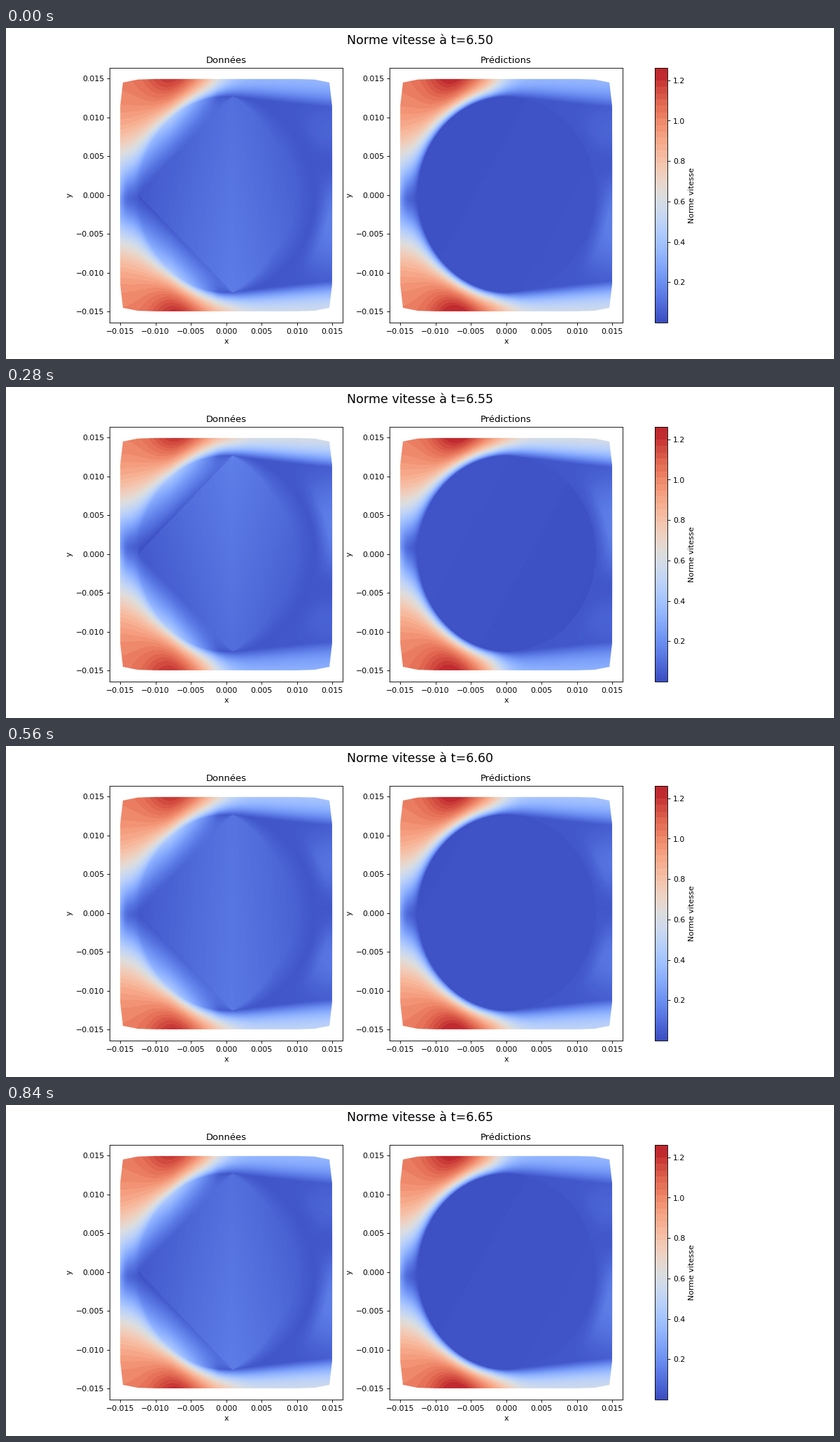
These frames come from a looping animation (1183x473 px, 980 ms). A matplotlib script:

```python
import numpy as np
import matplotlib.pyplot as plt
from matplotlib.animation import FuncAnimation
from matplotlib.colors import ListedColormap, Normalize
from matplotlib.patches import Polygon

WIDTH, HEIGHT, DPI = 1183, 473, 78.86
FRAMES, STEP_MS, PERIOD = 7, 140, 6
VMIN, VMAX = 0.0007, 1.2624
R = 12.6                       # cylinder radius, mm
TIP_X, TIP_Y = 0.7, 12.5       # top corner of the interpolated diamond

X, Y = np.meshgrid(np.linspace(-15.05, 15.05, 305), np.linspace(-15, 15, 334))
RAD = np.hypot(X, Y)
ABS_Y, SIDE = np.abs(Y), np.sign(Y)


def sigmoid(z):
    return 1 / (1 + np.exp(-z))


def bump(z):
    return np.exp(-z ** 2)


def mix(a, b, w):
    return a + (b - a) * w


def swing(n, peak=2.25):
    """Vortex shedding signal, +1 when the upper side is fastest."""
    return np.cos(2 * np.pi * (n - peak) / PERIOD)


def stream(s, slip, delta, boost):
    """Speed outside the cylinder: inflow, acceleration and shear layers."""
    y = np.abs(Y - 0.8 * s)
    inflow = 0.10 + 0.94 * (1 - np.exp(-(y / 6.2) ** 1.5))
    peak = (0.23 + boost + 0.02 * SIDE * s) * bump((X + 7.2 - 0.5 * SIDE * s) / 4)
    inflow = inflow + peak * np.clip((ABS_Y - 7) / 8, 0, 1)
    outflow = 0.50 + 0.16 * SIDE * s
    speed = mix(inflow, outflow, sigmoid((X + 0.3 - SIDE * s) / 1.2))

    down = np.maximum(X, 0)
    offset = slip * np.clip(-X / 8, 0.15, 1)
    front = 1 - np.exp(-(np.maximum(RAD - R, 0) + offset) / delta)
    depth = np.maximum(ABS_Y - 12.4 + 0.12 * down, 0)
    rear = 1 - np.exp(-(depth / (1.55 + 0.055 * down)) ** 1.5)
    v = speed * mix(front, rear, np.clip((X + 2) / 4, 0, 1))
    return v + 0.17 * bump((X + 15.2) / 0.7) * bump(Y / 3)


def wake(n):
    calm = -5 * swing(n, 2.4)
    edge = sigmoid((X - 11.5) / 1.2) * np.exp(-(ABS_Y / 9.5) ** 4)
    edge = edge * np.clip((RAD - R) / 2, 0, 1)
    return (0.035 + 0.13 * edge * (1 - bump((Y - calm) / 4.5))) * sigmoid(X / 0.8)


def measured(n):
    s = swing(n)
    outer = stream(s, 0.85, 1.42, 0)
    field = np.maximum(outer, wake(n))

    # flat triangles spanning the empty disc
    plane = 0.04 + 0.085 * (1 - np.abs(X - TIP_X) / 13.2) + 0.0022 * s * Y
    ring = 3 * np.clip((X - TIP_X) / 6, 0.02, 1)
    right = mix(0.03, plane, np.clip((R + 0.1 - RAD) / ring, 0, 1))
    right = np.maximum(right, 0.02)

    gap = 0.69 * (ABS_Y - (X + 12.5) * TIP_Y / (TIP_X + 12.5))
    share = np.clip(gap / np.maximum(gap + R - RAD, 1e-6), 0, 1)
    dip = 0.04 * np.clip(SIDE * s, 0, 1) * bump(gap / 0.8)
    strip = np.maximum(mix(plane - dip, outer, share), 0.015)

    disc = np.where(X > TIP_X, right, np.where(gap > 0, strip, plane))
    return np.where(RAD < R, disc, field)


def predicted(n):
    s = swing(n)
    field = np.maximum(stream(s, 0.08, 1.05, 0.025), wake(n))
    disc = 0.022 + 0.006 * np.clip(-X / 12, -1, 1) * s + 0.0003 * s * Y
    return np.where(RAD < R, disc, np.maximum(field, 0.02))


def outline():
    quarter = np.array([(15, 3.3), (14.98, 11.5), (14.6, 14.5), (12.5, 14.88), (10, 14.95)])
    upper = np.vstack([quarter, quarter[::-1] * (-1, 1)])
    return np.vstack([upper, upper[::-1] * (1, -1)]) / 1000


def make_cmap():
    """Smooth blues, banded reds, flat at the very top."""
    t = (np.arange(256) + 0.5) / 256
    bands = (np.floor(t * 40) + 0.5) / 40
    t = np.where(t > 0.62, bands, t)
    return ListedColormap(plt.get_cmap("coolwarm")(np.clip(t, 0, 0.965)))


cmap, norm = make_cmap(), Normalize(VMIN, VMAX)

# the small margin keeps the pixel size from rounding down
fig, axes = plt.subplots(1, 2, dpi=DPI,
                         figsize=((WIDTH + 0.01) / DPI, (HEIGHT + 0.01) / DPI))
heading = fig.suptitle("", fontsize=16)

panels = []
for ax, title, model in zip(axes, ("Données", "Prédictions"), (measured, predicted)):
    image = ax.imshow(model(0), origin="lower", aspect="auto", cmap=cmap, norm=norm,
                      extent=(-0.01505, 0.01505, -0.015, 0.015),
                      interpolation="bilinear")
    ax.set(xlim=(-0.0165, 0.0165), ylim=(-0.0164, 0.0164),
           xlabel="x", ylabel="y", title=title)
    image.set_clip_path(Polygon(outline(), transform=ax.transData))
    panels.append((image, model))

fig.colorbar(panels[0][0], ax=list(axes), label="Norme vitesse")


def draw(n):
    heading.set_text(f"Norme vitesse à t={6.5 + 0.025 * n + 1e-6:.2f}")
    for image, model in panels:
        image.set_data(model(n))
    return [heading] + [image for image, _ in panels]


anim = FuncAnimation(fig, draw, frames=FRAMES, interval=STEP_MS,
                     init_func=lambda: draw(0), repeat=True, blit=False)
plt.show()
```
